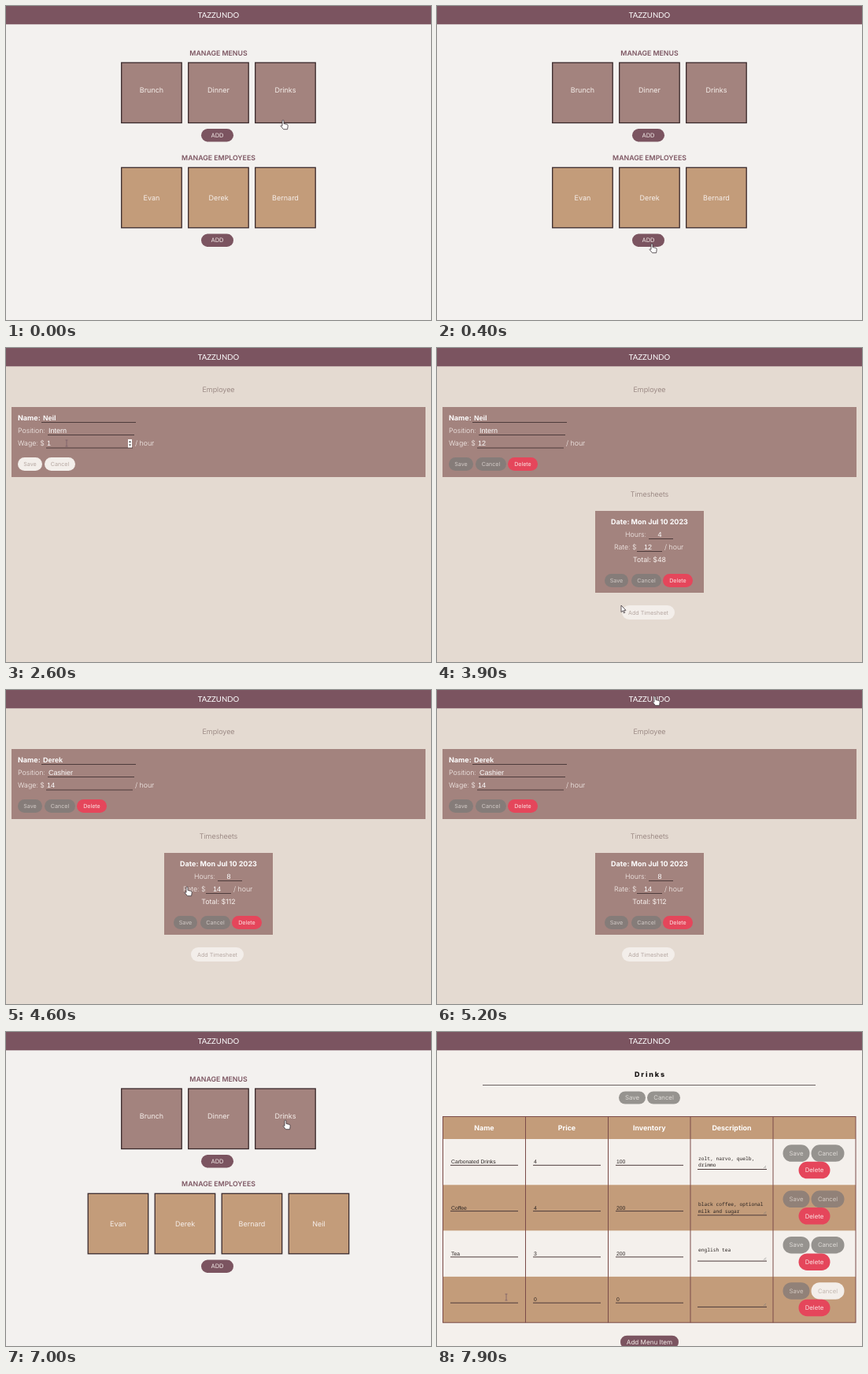
Recreate the animation shown at these times as an HTML page. Size 540 px wide and 399 px high, loop 8 s.

```html
<!DOCTYPE html>
<html lang="en">
<head>
<meta charset="utf-8">
<title>Cafe manager demo</title>
<style>
  html, body { margin: 0; width: 100%; height: 100%; overflow: hidden; }
  svg { display: block; width: 540px; height: 399px; }
  text { font-family: Inter, sans-serif; text-rendering: geometricPrecision; white-space: pre; }
  .input { font-family: "Liberation Sans", Arial, sans-serif; }
  .mono { font-family: "Noto Sans Mono", monospace; }
  .logo { font-family: Lato, sans-serif; }
</style>
</head>
<body>
<svg id="stage" viewBox="0 0 540 399"></svg>
<script>
const LOOP = 8000, STEP = 100;
const PLUM = '#7b5460', ROSE = '#a3837e', TAN = '#c39c7a', RED = '#e5465b';
const LINE = '#4d3b3b', PALE = '#f3eeea', SAND = '#e4dad1';
const stage = document.getElementById('stage');
const timed = [], typed = [];

function add(parent, tag, attrs = {}) {
  const node = document.createElementNS('http://www.w3.org/2000/svg', tag);
  for (const key in attrs) node.setAttribute(key, attrs[key]);
  return parent.appendChild(node);
}

// Group that is visible only within the given [from, to] spans.
function during(parent, ...spans) {
  const node = add(parent, 'g');
  timed.push({ node, spans });
  return node;
}

const rect = (g, x, y, width, height, fill, extra) =>
  add(g, 'rect', { x, y, width, height, fill, ...extra });

const line = (g, x1, y1, x2, y2, stroke = LINE) =>
  add(g, 'line', { x1, y1, x2, y2, stroke, 'stroke-width': 1 });

// y is the middle of the capitals.
function label(g, x, y, str, size, fill, extra) {
  const node = add(g, 'text', { x, y: y + size * 0.36, 'font-size': size, fill, ...extra });
  node.textContent = str;
  return node;
}

const middle = (g, x, y, str, size, fill, extra) =>
  label(g, x, y, str, size, fill, { 'text-anchor': 'middle', ...extra });

function pill(g, x, y, w, h, str, size, fill, color) {
  rect(g, x, y, w, h, fill, { rx: h / 2 });
  middle(g, x + w / 2, y + h / 2, str, size, color);
}

// Text whose content changes at given times: [[time, string], ...].
function typing(node, ...steps) {
  typed.push({ node, steps });
}

const letters = (word, start, gap) =>
  [...word].map((_, i) => [start + i * gap, word.slice(0, i + 1)]);

// Home

function cards(g, names, y, textY, fill) {
  const left = 270 - (names.length - 1) * 42.5;
  names.forEach((name, i) => {
    const x = left + i * 85;
    rect(g, x - 38.3, y, 76.5, 76.5, fill, { stroke: '#39292b', 'stroke-width': 1.3 });
    middle(g, x, textY, name, 9, '#f6efeb');
  });
}

function home() {
  const g = during(stage, [0, 600], [4200, 4500], [5300, 5700], [6700, 7100]);
  rect(g, 0, 0, 540, 399, '#f3f1ef');
  const heading = { 'font-weight': 600 };
  middle(g, 270, 59.5, 'MANAGE MENUS', 8.75, PLUM, heading);
  cards(g, ['Brunch', 'Dinner', 'Drinks'], 72, 106.5, ROSE);
  pill(g, 248, 156, 41, 16.5, 'ADD', 7.5, PLUM, '#f4ebe8');
  middle(g, 270, 192.5, 'MANAGE EMPLOYEES', 8.75, PLUM, heading);
  const staff = ['Evan', 'Derek', 'Bernard'];
  cards(during(g, [0, 600]), staff, 205.3, 244, TAN);
  cards(during(g, [4200, LOOP]), [...staff, 'Neil'], 205.3, 244, TAN);
  pill(g, 248, 289.5, 41, 16.5, 'ADD', 7.5, PLUM, '#f4ebe8');
}

// Employee

function saveCancel(g, x, y, active, w = [31, 39], gap = 3) {
  const colors = active ? [PALE, '#b5a7a1'] : ['#857c79', '#d3cbc7'];
  pill(g, x, y, w[0], 17, 'Save', 7.1, ...colors);
  pill(g, x + w[0] + gap, y, w[1], 17, 'Cancel', 7.1, ...colors);
}

const remove = (g, x, y) => pill(g, x, y, 38, 17, 'Delete', 7.1, RED, '#fbe3e3');

function employeeForm(g) {
  rect(g, 0, 0, 540, 399, SAND);
  middle(g, 270, 53, 'Employee', 9, '#8a7672', { 'font-weight': 300 });
  rect(g, 7, 75, 526, 89, ROSE);
  label(g, 15, 88.5, 'Name:', 9, '#fff', { 'font-weight': 700 });
  label(g, 15, 104.5, 'Position:', 8.8, '#f8f1ee', { 'font-weight': 300 });
  label(g, 15, 121, 'Wage: $', 8.8, '#f8f1ee', { 'font-weight': 300 });
  label(g, 164, 121, '/ hour', 8.8, '#f8f1ee', { 'font-weight': 300 });
  line(g, 45, 94.5, 165, 94.5);
  line(g, 53, 110.5, 163, 110.5);
  line(g, 51, 127, 161, 127);
  const value = (x, y, weight) =>
    label(g, x, y, '', 9, '#fff', { class: 'input', 'font-weight': weight });
  return [value(47, 88.5, 700), value(54, 104.5, 400), value(52, 121, 400)];
}

function timesheet(g, rate) {
  const light = { 'font-weight': 300 };
  rect(g, 201, 207, 138, 104, ROSE);
  middle(g, 270, 220.5, 'Date: Mon Jul 10 2023', 9, '#fff', { 'font-weight': 700 });
  label(g, 239, 236.8, 'Hours:', 8.8, '#f8f1ee', light);
  line(g, 269, 242.5, 300, 242.5);
  label(g, 225, 252.8, 'Rate: $', 8.8, '#f8f1ee', light);
  line(g, 254, 258.5, 286, 258.5);
  label(g, 289, 252.8, '/ hour', 8.8, '#f8f1ee', light);
  const input = { class: 'input' };
  middle(g, 268, 252.8, rate, 9, '#fff', input);
  return [
    middle(g, 283, 236.8, '', 9, '#fff', input),
    middle(g, 270, 269, '', 8.8, '#f8f1ee')
  ];
}

const sheetButtons = (g, active) => saveCancel(g, 213, 287, active, [30, 38], 4);
const sheetHeading = g => middle(g, 270, 186, 'Timesheets', 9, '#8a7672', { 'font-weight': 300 });
const addSheet = (g, y) => pill(g, 235, y, 67, 18, 'Add Timesheet', 7.1, PALE, '#b5a7a1');

function newEmployee() {
  const g = during(stage, [600, 4200]);
  const [name, role, wage] = employeeForm(g);
  typing(name, ...letters('Neil', 1500, 100));
  typing(role, ...letters('Intern', 1900, 75));
  typing(wage, [0, '0'], [2500, '1'], [2700, '12']);

  const spinner = during(g, [2300, 2900]);
  rect(spinner, 155, 116, 5, 10.5, '#fff');
  add(spinner, 'path', { d: 'M156 120l1.5-2 1.5 2zM156 122.5l1.5 2 1.5-2z', fill: '#333' });

  saveCancel(during(g, [600, 1500], [3000, 4200]), 15, 139, false);
  saveCancel(during(g, [1500, 3000]), 15, 139, true);

  const saved = during(g, [3000, 4200]);
  remove(saved, 90, 139);
  sheetHeading(saved);
  addSheet(during(saved, [3000, 3300]), 207);

  const sheet = during(saved, [3300, 4200]);
  const [hours, total] = timesheet(sheet, '12');
  typing(hours, [0, '0'], [3500, '4']);
  typing(total, [0, 'Total: $0'], [3500, 'Total: $48']);
  sheetButtons(during(sheet, [3300, 3700]), true);
  const done = during(sheet, [3700, 4200]);
  sheetButtons(done, false);
  remove(done, 287, 287);
  addSheet(sheet, 327);
}

function cashier() {
  const g = during(stage, [4500, 5300]);
  const form = employeeForm(g);
  ['Derek', 'Cashier', '14'].forEach((str, i) => form[i].textContent = str);
  saveCancel(g, 15, 139, false);
  remove(g, 90, 139);
  sheetHeading(g);
  const [hours, total] = timesheet(g, '14');
  hours.textContent = '8';
  total.textContent = 'Total: $112';
  sheetButtons(g, false);
  remove(g, 287, 287);
  addSheet(g, 327);
}

// Menus

const GRAY = ['#96938f', '#dedad6'];
const COLUMNS = [7.5, 112.5, 217.5, 322, 427, 532];

function menuRow(g, i, [name, price, stock, ...notes], dirty) {
  const y = 136 + i * 58.3;
  const tan = i % 2;
  rect(g, 7.5, y, 524.5, 58.3, tan ? TAN : '#f4f0ec');
  [name, price, stock].forEach((str, c) => {
    const x = [18, 123, 228][c];
    label(g, x, y + 29, str, 6.8, '#2b2422', { class: 'input' });
    line(g, x - 1, y + 33.3, x + 85, y + 33.3);
  });
  notes.forEach((str, n) =>
    label(g, 332, y + 24.5 + n * 8.5, str, 6.25, '#2b2422', { class: 'mono' }));
  line(g, 331, y + 38.5, 419, y + 38.5);
  add(g, 'path', { d: `M415 ${y + 37}l3-3m-1 3l1-1`, stroke: '#777', 'stroke-width': 0.6 });
  const gray = tan ? ['#918178', '#d3c8c0'] : GRAY;
  pill(g, 439.5, y + 7.3, 34, 21.5, 'Save', 7.7, ...gray);
  pill(g, 475.5, y + 7.3, 42, 21.5, 'Cancel', 7.7, ...(dirty ? [PALE, '#c3b8b1'] : gray));
  pill(g, 459.5, y + 28.8, 40, 21.5, 'Delete', 7.8, RED, '#fbe3e3');
}

function menuFrame(g, count) {
  const bottom = 136 + count * 58.3;
  rect(g, 7.5, 107.5, 524.5, bottom - 107.5, 'none', { stroke: '#7a4a48' });
  COLUMNS.slice(1, -1).forEach(x => line(g, x, 107.5, x, bottom, '#7a4a48'));
  pill(g, 233, bottom + 16.5, 74, 16.5, 'Add Menu Item', 8.1, PLUM, '#f4ebe8');
}

function menuPage(title, span, rows) {
  const g = during(stage, span);
  rect(g, 0, 0, 540, 399, '#f4f0ec');
  middle(g, 271, 53.5, title, 9, '#171313', { 'font-weight': 800, 'letter-spacing': 1.8 });
  line(g, 58, 67.5, 481, 67.5, '#6b6262');
  pill(g, 231, 75.5, 34, 16, 'Save', 7.8, ...GRAY);
  pill(g, 267, 75.5, 42, 16, 'Cancel', 7.8, ...GRAY);
  rect(g, 7.5, 107.5, 524.5, 28.5, TAN);
  ['Name', 'Price', 'Inventory', 'Description'].forEach((str, i) =>
    middle(g, (COLUMNS[i] + COLUMNS[i + 1]) / 2, 122, str, 8.9, '#fff', { 'font-weight': 700 }));
  rows.forEach((row, i) => menuRow(g, i, row));
  return g;
}

function menus() {
  const brunch = menuPage('Brunch', [5700, 6700], [
    ['Omlette', 5, 100, 'A basic Omlette with', 'bread'],
    ['Pancake', 6, 100, 'stack of 3 buttermilk', 'pancakes with syrup'],
    ['brunch special', 12, 50, 'egg, bacon, pancakes', 'and a drink of choice'],
    ['egg and bacon', 6, 100, 'bacon and egg']
  ]);
  menuFrame(brunch, 4);

  const drinks = menuPage('Drinks', [7100, LOOP], [
    ['Carbonated Drinks', 4, 100, 'zolt, narvo, quelb,', 'drimmo'],
    ['Coffee', 4, 200, 'black coffee, optional', 'milk and sugar'],
    ['Tea', 3, 200, 'english tea']
  ]);
  menuFrame(during(drinks, [7100, 7500]), 3);
  const extra = during(drinks, [7500, LOOP]);
  menuRow(extra, 3, ['', 0, 0], true);
  menuFrame(extra, 4);
}

home();
newEmployee();
cashier();
menus();
rect(stage, 0, 0, 540, 23.3, PLUM);
middle(stage, 270, 11.3, 'TAZZUNDO', 9.6, '#fff', { class: 'logo' });

// Pointer

const pointer = add(stage, 'g');
const outline = { fill: '#fff', stroke: '#3a3236', 'stroke-width': 0.8, 'stroke-linejoin': 'round' };
const shapes = {
  hand: add(pointer, 'path', {
    d: 'M-1 1c0-1.4 2-1.4 2 0V4.5l3.8.9q1.6.4 1.4 2l-.6 4.3H.6L-2.9 7.6q0-1.3 1.9-.3z', ...outline }),
  arrow: add(pointer, 'path', { d: 'M0 0V8.6l2-1.8 1.4 3 1.3-.6-1.4-2.9h2.7z', ...outline }),
  beam: add(pointer, 'path', {
    d: 'M-1.5-4h3M0-4V4M-1.5 4h3', fill: 'none', stroke: '#7a5f68', 'stroke-width': 0.8 })
};

const route = [
  [0, 352, 145, 'hand'], [100, 352, 145, 'arrow'], [400, 273, 302, 'hand'],
  [900, 273, 302, 'arrow'], [1300, 90, 89, 'beam'], [1800, 90, 89, 'beam'],
  [1900, 90, 105, 'beam'], [2200, 90, 105, 'beam'], [2300, 77, 121, 'beam'],
  [2700, 77, 121, 'arrow'], [2900, 30, 147, 'hand'], [3000, 30, 147, 'arrow'],
  [3200, 268, 214, 'hand'], [3300, 268, 214, 'arrow'], [3400, 290, 237, 'beam'],
  [3500, 290, 237, 'arrow'], [3600, 228, 294, 'hand'], [3700, 228, 294, 'arrow'],
  [3800, 234, 327, 'arrow'], [3900, 234, 327, 'arrow'], [4100, 277, 8, 'hand'],
  [4200, 277, 8, 'arrow'], [4400, 230, 250, 'hand'], [4700, 230, 250, 'arrow'],
  [5100, 277, 8, 'hand'], [5300, 277, 8, 'arrow'], [5500, 185, 112, 'hand'],
  [5800, 185, 112, 'arrow'], [6200, 466, 274, 'arrow'], [6400, 466, 274, 'arrow'],
  [6600, 272, 8, 'hand'], [6700, 272, 8, 'arrow'], [6900, 355, 112, 'hand'],
  [7100, 355, 112, 'arrow'], [7400, 270, 334, 'hand'], [7500, 270, 334, 'arrow'],
  [7800, 88, 337, 'beam'], [LOOP, 88, 337, 'beam']
];

function movePointer(t) {
  const i = route.findIndex(key => key[0] > t);
  const [t0, x0, y0, kind] = route[i - 1], [t1, x1, y1] = route[i];
  const p = (t - t0) / (t1 - t0), k = p * p * (3 - 2 * p);
  pointer.setAttribute('transform', `translate(${x0 + (x1 - x0) * k} ${y0 + (y1 - y0) * k})`);
  for (const name in shapes) shapes[name].style.display = name === kind ? '' : 'none';
}

function render(t) {
  for (const { node, spans } of timed)
    node.style.display = spans.some(([from, to]) => t >= from && t < to) ? '' : 'none';
  for (const { node, steps } of typed) {
    const last = steps.filter(([at]) => at <= t).pop();
    node.textContent = last ? last[1] : '';
  }
  movePointer(t);
}

const start = performance.now();
function tick() {
  const elapsed = (performance.now() - start) % LOOP;
  render(Math.floor(elapsed / STEP) * STEP);
  requestAnimationFrame(tick);
}
tick();
</script>
</body>
</html>
```
